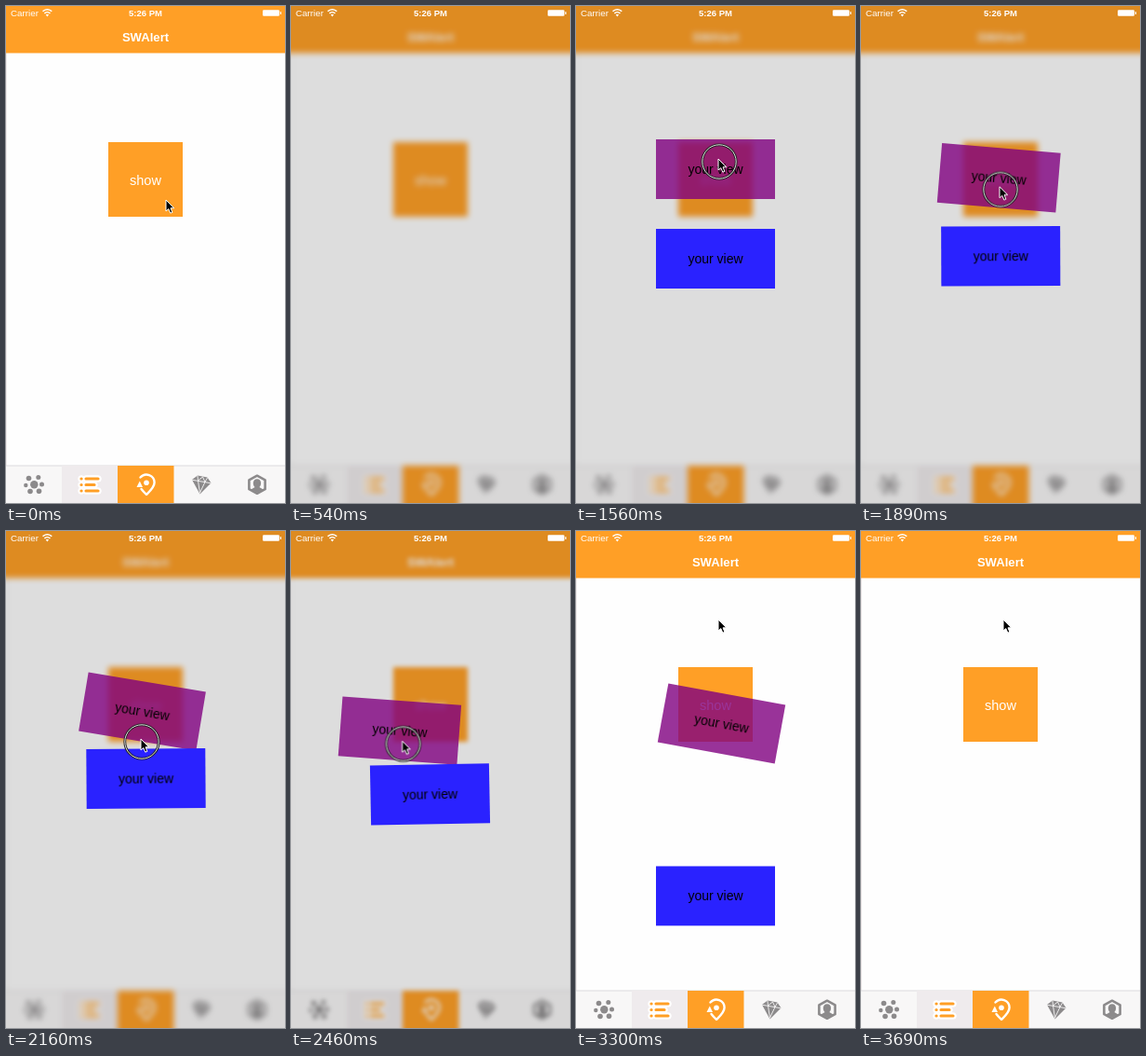
An HTML page for the animation above (3.72 s loop, 300 px wide and 533 px high).

```html
<!DOCTYPE html>
<html lang="en">
<head>
<meta charset="utf-8">
<title>Alert demo</title>
<style>
  html, body { margin: 0; width: 100%; height: 100%; overflow: hidden; background: #fefefe; }
  .stage { position: relative; width: 300px; height: 533px; overflow: hidden; }
  svg { position: absolute; left: 0; top: 0; width: 300px; height: 533px; overflow: visible;
        font-family: "Liberation Sans", Arial, sans-serif; }
  text { text-anchor: middle; }
  .orange { fill: #ff9f26; }
  .white { fill: #fff; }
  .grey { fill: #8c8a8b; }
  .line { fill: none; stroke-linecap: round; stroke-linejoin: round; }

  .scene, .dim, .purple, .blue, .cursor, .ring {
    animation: 3720ms infinite ease-in-out;
  }
  .scene { animation-name: blur; }
  .dim { animation-name: dim; }
  .purple { animation-name: purple; }
  .blue { animation-name: blue; }
  .cursor { animation-name: cursor, seen; }
  .ring { animation-name: press; animation-timing-function: step-end; }

  @keyframes blur {
    0%, 8.87% { filter: blur(0); }
    13.7%, 62% { filter: blur(3px); }
    75%, 82.5% { filter: blur(2.3px); }
    87.1%, 100% { filter: blur(0); }
  }
  @keyframes dim {
    0%, 8.87% { opacity: 0; }
    13.7%, 82.5% { opacity: .13; }
    87.1%, 100% { opacity: 0; }
  }
  @keyframes purple {
    0%, 12.9% { transform: translate(150px, -200px) rotate(0deg); }
    23.5% { transform: translate(135.5px, 215px) rotate(28deg); }
    28.23% { transform: translate(154px, 165px) rotate(-8deg); }
    33.06% { transform: translate(149px, 177px) rotate(2deg); }
    37.1%, 43.55% { transform: translate(150px, 175px) rotate(0deg); }
    58.06% { transform: translate(146.5px, 193.5px) rotate(9.5deg); }
    75% { transform: translate(82.5px, 238px) rotate(-1.9deg); }
    83.06% { transform: translate(156.5px, 86px) rotate(10.4deg); }
    83.87% { transform: translate(156.5px, 86px) rotate(10.4deg);
             animation-timing-function: cubic-bezier(.333, 0, .667, .333); }
    94.35%, 100% { transform: translate(156.5px, 645px) rotate(10.4deg); }
  }
  @keyframes blue {
    0%, 12.9% { transform: translate(150px, -104px) rotate(0deg); }
    23.5% { transform: translate(135.5px, 311px) rotate(28deg); }
    28.23% { transform: translate(154px, 261px) rotate(-8deg); }
    33.06% { transform: translate(149px, 273px) rotate(2deg); }
    37.1%, 43.55% { transform: translate(150px, 271px) rotate(0deg); }
    58.06% { transform: translate(150.5px, 265.5px) rotate(-.4deg); }
    75% { transform: translate(148.3px, 302px) rotate(-1.9deg); }
    81% { transform: translate(150px, 271px) rotate(0deg); }
    83.87% { transform: translate(150px, 271px) rotate(0deg);
             animation-timing-function: cubic-bezier(.333, 0, .667, .333); }
    94.35%, 100% { transform: translate(150px, 830px) rotate(0deg); }
  }
  @keyframes cursor {
    0%, 34.68% { transform: translate(172px, 208px); }
    40.32%, 43.55% { transform: translate(153px, 164px); }
    58.06% { transform: translate(145px, 223px); }
    75% { transform: translate(90px, 228px); }
    83.06%, 100% { transform: translate(153px, 95px); }
  }
  @keyframes seen {
    0%, 12.85% { visibility: visible; }
    12.9%, 34.6% { visibility: hidden; }
    34.68%, 100% { visibility: visible; }
  }
  @keyframes press {
    0% { opacity: 0; }
    4.84% { opacity: 1; }
    8.87% { opacity: 0; }
    41.13% { opacity: 1; }
    83.87%, 100% { opacity: 0; }
  }
</style>
</head>
<body>
<div class="stage">
  <svg class="scene">
    <!-- Shapes run past the edges so the blur stays even there -->
    <rect x="-20" y="-20" width="340" height="580" fill="#fefefe"/>
    <rect y="50" width=".8" height="443" fill="#ebe5e6"/>
    <rect class="orange" x="-20" y="-20" width="340" height="70.5"/>
    <text class="white" x="150" y="38" font-size="13.1" font-weight="bold">SWAlert</text>
    <rect class="orange" x="110" y="146" width="80" height="80"/>
    <text class="white" x="150" y="191.5" font-size="14.6">show</text>

    <rect x="-20" y="493" width="340" height="60" fill="#f8f7f7"/>
    <rect x="-20" y="492.5" width="340" height="1" fill="#dedcdd"/>
    <rect x="60" y="493" width="60" height="60" fill="#efebed"/>
    <rect class="orange" x="120" y="493" width="60.5" height="60"/>

    <g class="grey">
      <circle cx="30.3" cy="513.3" r="4.2"/>
      <circle cx="24.5" cy="506.5" r="2.8"/>
      <circle cx="34.8" cy="505.5" r="2.5"/>
      <circle cx="38.5" cy="513" r="2.5"/>
      <circle cx="35.5" cy="520.3" r="2.8"/>
      <circle cx="26" cy="520.5" r="2.8"/>
      <circle cx="21.3" cy="514" r="2.2"/>
    </g>
    <g class="line">
      <path id="list" d="M81 507h.1M86 507h13M81 513.5h.1M86 513.5h9M81 520h.1M86 520h13"
            stroke="#fff" stroke-width="7"/>
      <use href="#list" style="stroke: #ff9f26"/>
      <path d="M81 507h.1M86 507h13M81 513.5h.1M86 513.5h9M81 520h.1M86 520h13"
            stroke="#ff9f26" stroke-width="3.2"/>
      <path d="M144.5 505.5A8.6 8.6 0 0 1 159.6 511C159.6 516 155 520 151 524C149 522 147 520 145.5 518"
            stroke="#fff" stroke-width="2.4"/>
    </g>
    <circle class="white" cx="151" cy="511.3" r="2.8"/>
    <path class="white" d="M140.5 516L143.8 509.5L147 516Z"/>
    <path class="grey" d="M200 508L206 503.5L216.5 505.5L220.5 511.5L208.5 523.5Z"/>
    <path class="line" d="M200.5 508.3L220 511.7M206 504L206.5 509.2L208.5 522M216.5 506L214 510.5L208.5 522M206.5 509L211.5 505L214 510.5"
          stroke="#f8f7f7" stroke-width=".9"/>
    <path class="line" d="M270 503.7L278.6 508.3V518.2L270 522.8L261.4 518.2V508.3Z"
          stroke="#8c8a8b" stroke-width="2.6"/>
    <path class="grey" d="M270 507.3C275 507.3 275 514 272.4 516L276.5 518.5L270 522L263.5 518.5L267.6 516C265 514 265 507.3 270 507.3Z"/>
  </svg>

  <svg>
    <rect class="dim" width="300" height="533"/>
    <g class="white">
      <text x="20" y="11" font-size="9.8">Carrier</text>
      <text x="150" y="11" font-size="9.5" font-weight="bold">5:26 PM</text>
      <rect x="276" y="4.2" width="18" height="6.6" rx="1.2"/>
      <rect x="294.8" y="6" width="1.2" height="3" rx=".6"/>
      <path d="M44.4 11.5L42.7 9.3Q44.4 8 46.1 9.3Z"/>
    </g>
    <path class="line" d="M41.8 7.6Q44.4 5.6 47 7.6M40 5.4Q44.4 2.2 48.8 5.4" stroke="#fff" stroke-width="1.4"/>

    <g class="purple">
      <rect x="-64" y="-32" width="128" height="64" fill="#800080" opacity=".8"/>
      <text y="5" font-size="14">your view</text>
    </g>
    <g class="blue">
      <rect x="-64" y="-32" width="128" height="64" fill="#2a22ff"/>
      <text y="5" font-size="14">your view</text>
    </g>
    <g class="cursor">
      <g class="ring" fill="none">
        <circle cx="1" cy="3" r="18.2" stroke="#222" stroke-width="2.8"/>
        <circle cx="1" cy="3" r="18.2" stroke="#ddd" stroke-width="1"/>
      </g>
      <path d="M0 0V12L2.8 9.6L4.8 14.2L6.9 13.3L5 8.8H8.7Z" stroke="#fff" stroke-width="1"/>
    </g>
  </svg>
</div>
</body>
</html>
```
